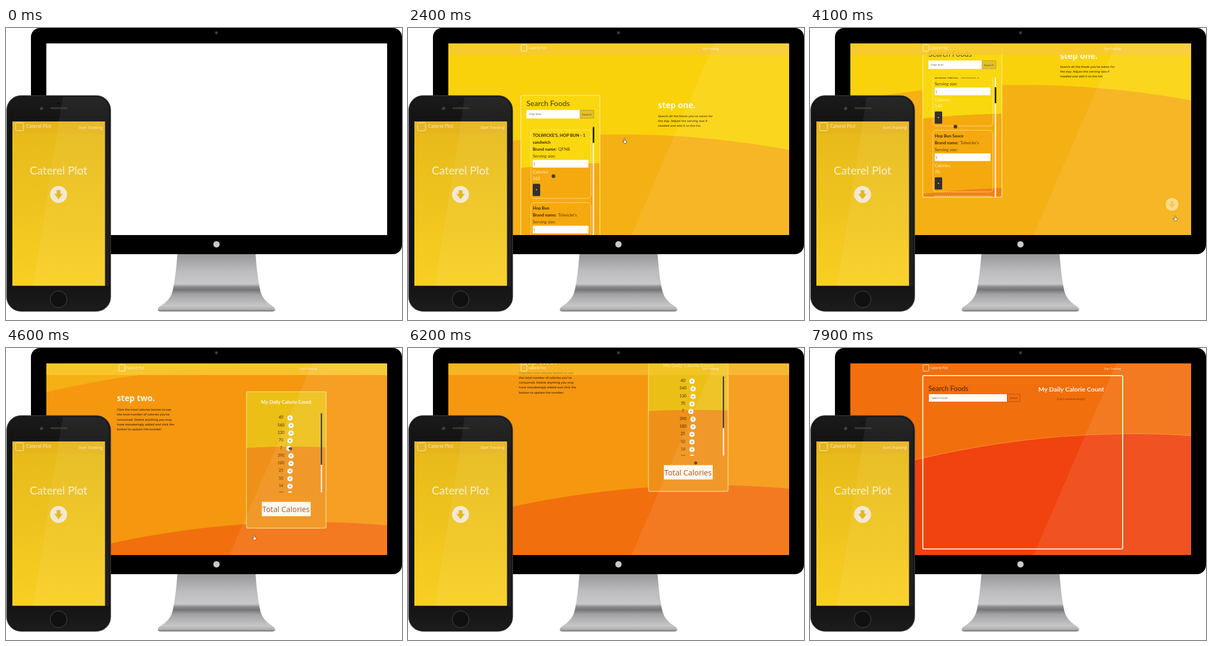
Animation of 746x550 px, one loop 8000 ms. Source, as an HTML page with a canvas:

```html
<!DOCTYPE html>
<html lang="en">
<head>
<meta charset="utf-8">
<title>Calorie app preview</title>
<style>
html, body { margin: 0; width: 100%; height: 100%; overflow: hidden; background: #fff; }
canvas { display: block; }
</style>
</head>
<body>
<canvas id="stage" width="746" height="550"></canvas>
<script>
const ctx = document.getElementById('stage').getContext('2d');
const LOOP = 8000, STEP = 100;
const APP = 'Caterel Plot';
const LATO = 'Lato, sans-serif', SANS = '"Open Sans", sans-serif';

const clamp = v => Math.max(0, Math.min(1, v));
const swing = p => 0.5 - Math.cos(Math.PI * clamp(p)) / 2;
const during = (t, start, length) => swing((t - start) / length);

function track(keys, t) {
  let a = keys[0];
  for (const b of keys) {
    if (t < b[0]) {
      const p = b === a ? 0 : swing((t - a[0]) / (b[0] - a[0]));
      return [a[1] + (b[1] - a[1]) * p, a[2] + (b[2] - a[2]) * p];
    }
    a = b;
  }
  return [a[1], a[2]];
}

function text(str, x, y, size, color, font = SANS, weight = 400, align = 'left') {
  ctx.font = `${weight} ${size}px ${font}`;
  ctx.textAlign = align;
  ctx.fillStyle = color;
  ctx.fillText(str, x, y);
}

function rect(x, y, w, h, fill) {
  ctx.fillStyle = fill;
  ctx.fillRect(x, y, w, h);
}

function round(x, y, w, h, r, fill, stroke, line = 1) {
  ctx.beginPath();
  ctx.roundRect(x, y, w, h, r);
  if (fill) { ctx.fillStyle = fill; ctx.fill(); }
  if (stroke) { ctx.strokeStyle = stroke; ctx.lineWidth = line; ctx.stroke(); }
}

function disc(x, y, r, fill, stroke) {
  ctx.beginPath();
  ctx.arc(x, y, r, 0, 7);
  ctx.fillStyle = fill;
  ctx.fill();
  if (stroke) { ctx.strokeStyle = stroke; ctx.lineWidth = 1; ctx.stroke(); }
}

function shape(points, fill) {
  ctx.beginPath();
  points.forEach(([x, y]) => ctx.lineTo(x, y));
  ctx.closePath();
  ctx.fillStyle = fill;
  ctx.fill();
}

function fade(y0, y1, ...stops) {
  const g = ctx.createLinearGradient(0, y0, 0, y1);
  stops.forEach(([p, c]) => g.addColorStop(p, c));
  return g;
}

function layer(dy, draw, alpha = 1) {
  ctx.save();
  ctx.globalAlpha *= alpha;
  ctx.translate(0, dy);
  draw();
  ctx.restore();
}

function clip(x, y, w, h, r = 0) {
  ctx.beginPath();
  ctx.roundRect(x, y, w, h, r);
  ctx.clip();
}

function arrowButton(x, y, r, back, front) {
  disc(x, y, r, back);
  const k = r / 16;
  shape([[-3.5, -8], [3.5, -8], [3.5, -1], [8, -1], [0, 9], [-8, -1], [-3.5, -1]]
    .map(([a, b]) => [x + a * k, y + b * k]), front);
}

// Fills everything below a shallow arc whose highest point is (px, y)
function wave(y, px, color, edge) {
  ctx.beginPath();
  for (let x = 70; x <= 722; x += 4) ctx.lineTo(x, y + 0.00029 * (x - px) ** 2);
  if (edge) { ctx.strokeStyle = edge; ctx.lineWidth = 1.5; ctx.stroke(); }
  ctx.lineTo(722, 3000);
  ctx.lineTo(70, 3000);
  ctx.fillStyle = color;
  ctx.fill();
}

const WAVES = [
  [290, 250, '#f9d20b'],
  [517, 400, '#f5b014'],
  [806, 480, '#f5970f'],
  [1098, 570, '#f26f0e'],
  [1352, 610, '#f0430f', '#f5a040']
];

function backdrop(scroll) {
  rect(76, 29, 642, 361, '#f9d114');
  WAVES.forEach(([y, ...rest]) => wave(y - scroll, ...rest));
}

function hero(t) {
  const show = during(t, 100, 700);
  layer(0, () => {
    text(APP, 401, 150, 56, '#fff', LATO, 400, 'center');
    text('Tracking Calories Made Easy.', 401, 184, 13.2, '#fffbe8', LATO, 400, 'center');
    arrowButton(401, 211, 12, '#fbf2c8', '#f2c514');
  }, show);
}

const FOODS = [
  { title: ["TOLWICKE'S, HOP BUN - 1", 'sandwich'], brand: 'QFNB', kcal: 562 },
  { title: ['Hop Bun'], brand: "Tolwicke's", kcal: 540 },
  { title: ['Hop Bun Sauce'], brand: "Tolwicke's", kcal: 70 },
  { title: ['Hop Bun Sauce'], brand: "Tolwicke's", kcal: 90 }
];

function foodItem(food, y) {
  const extra = (food.title.length - 1) * 13;
  ctx.setLineDash([3, 1]);
  round(231.5, y + 0.5, 113, 116 + extra, 6, null, 'rgba(255,245,200,.85)');
  ctx.setLineDash([]);
  food.title.forEach((line, i) => text(line, 235, y + 14 + i * 13, 8, '#3a2500', LATO, 700));
  const b = y + extra;
  text('Brand name:', 235, b + 27, 8, '#3a2500', LATO, 700);
  text(food.brand, 283, b + 27, 8, '#5a3c05', LATO);
  text('Serving size:', 235, b + 40, 8, '#5a3c05', LATO);
  rect(235, b + 44, 105, 14.5, '#fffdf8');
  text('1', 236, b + 55, 7, '#444');
  text('Calories:', 235, b + 70, 8, '#fff3d0', LATO);
  text(food.kcal, 235, b + 82, 8, '#fff3d0', LATO);
  round(235, b + 89, 14, 23, 1.5, '#33302e');
  text('+', 242, b + 103, 6, '#fff', SANS, 700, 'center');
  return y + 124 + extra;
}

function searchField(x, y, w, h, label, size) {
  rect(x, y, w, h, '#fffefa');
  text(label, x + 5, y + h / 2 + 2, size, '#665f55');
}

function stepOne(t) {
  const list = 167 * during(t, 3150, 850);
  ctx.save();
  clip(212, 53, 149, 285, 3);
  rect(212, 53, 149, 285, '#f9d80f');
  wave(181, 390, '#f5a90f');
  wave(320, 420, '#ee8418');
  text('Search Foods', 223, 74, 14, '#4a3500', LATO);
  searchField(223, 81, 101, 16, 'hop bun', 6);
  ctx.setLineDash([2, 1]);
  round(324, 81.5, 26, 15, 0, '#e5c02c', '#8a7420', 0.8);
  ctx.setLineDash([]);
  text('Search', 337, 91.5, 6, '#5c4a10', SANS, 400, 'center');
  ctx.save();
  clip(225, 113, 122, 225);
  let y = 118 - list;
  for (const food of FOODS) y = foodItem(food, y);
  ctx.restore();
  rect(348, 113, 2.5, 225, '#fff4d8');
  rect(348, 113 + list * 0.11, 3, 30, '#222');
  ctx.restore();
  round(212.5, 53.5, 149, 285, 3, null, '#ffeaa0', 1.3);
  disc(274, 205.5, 3.5, '#4a3a20');

  text('step one.', 471, 78, 15.5, '#fffbe8', SANS, 700);
  ["Search all the foods you've eaten for", 'the day. Adjust the serving size if', 'needed and add it to the list.']
    .forEach((line, i) => text(line, 471, 95 + i * 9, 5.9, '#4e3a04', SANS, 600));
  ctx.globalAlpha = t >= 3700 ? 0.62 : 1;
  arrowButton(682, 352, 12, '#fbf0c8', '#f2b818');
}

const COUNTS = [40, 540, 130, 70, 7, 390, 180, 25, 50, 14, 20];

function stepTwo(t) {
  text('step two.', 209, 80, 15.5, '#fffaf0', SANS, 700);
  ['Click the total calories button to see', "the total number of calories you've",
   'consumed. Delete anything you may', 'have mistakeingly added and click the', 'button to update the number.']
    .forEach((line, i) => text(line, 209, 98.5 + i * 9.1, 5.9, '#4a2a04', SANS, 600));

  ctx.save();
  clip(453, 62, 150, 257, 3);
  rect(453, 62, 150, 257, '#ecbf17');
  wave(166, 540, '#ef9018');
  text('My Daily Calorie Count', 528, 85, 9.2, '#fff8e8', LATO, 700, 'center');
  ctx.save();
  clip(500, 103, 80, 149.5);
  COUNTS.forEach((n, i) => {
    const y = 112 + i * 14.3;
    const x = 531 + 2 * String(n).length;
    text(n, 518, y + 1.5, 7.5, '#4a2c08', LATO, 400, 'center');
    disc(x, y, 5, '#fffaf0');
    disc(x, y, 1, '#4a3a2a');
  });
  ctx.restore();
  rect(593, 103, 2.5, 149, '#fff0d8');
  rect(593, 103, 2.5, 97, '#2a241e');
  rect(482, 270, 92, 27, '#fff7ec');
  text('Total Calories', 527.5, 289.5, 14.3, '#9a4a1c', SANS, 400, 'center');
  const [dx, dy] = track([[4600, 536, 170], [5200, 542, 266]], t);
  disc(dx, dy, 3, '#55402a');
  ctx.restore();
  round(453, 62.5, 150, 257, 3, null, '#f9dc88', 1.3);
}

function tracker() {
  round(212.5, 52, 376.5, 326.5, 2, null, '#fff0da', 2);
  text('Search Foods', 223, 80.5, 12.9, '#4a2408', LATO);
  searchField(224, 87, 147, 14, 'Search foods..', 5);
  ctx.setLineDash([2, 1]);
  round(371.5, 87, 24, 14, 0, null, '#7a3c10', 0.8);
  ctx.setLineDash([]);
  text('Search', 383.5, 96, 5, '#7a3408', SANS, 400, 'center');
  text('My Daily Calorie Count', 492, 82, 12, '#fff6ec', LATO, 700, 'center');
  text('(List is currently empty)', 492, 98, 4.9, '#7a2c08', SANS, 400, 'center');
}

function pointer(x, y, hand) {
  const pts = hand
    ? [[0, 0], [2, 0], [2, 4], [5, 5], [4, 9], [0, 9], [-3, 5], [0, 6]]
    : [[0, 0], [5, 5], [3, 5], [4, 8], [2, 8], [1, 6], [0, 7]];
  shape(pts.map(([a, b]) => [x + a, y + b]), '#fff');
  ctx.strokeStyle = '#4a4430';
  ctx.lineWidth = 0.8;
  ctx.stroke();
}

const MOUSE = [
  [1000, 540, 110], [1500, 407, 208], [2600, 407, 208], [3050, 679, 324],
  [3500, 682, 348], [4000, 687, 354], [4300, 687, 354], [5000, 120, 350]
];

function nav(t) {
  layer(0, () => rect(76, 29, 642, 22, '#f8ca32'), 0.86 * (1 - during(t, 6040, 400)));
  round(213, 31.5, 11, 12, 1.5, null, '#fff6e0', 1);
  text(APP, 227, 39.5, 6.2, '#fffaf0');
  text('Start Tracking', 554, 40.5, 5, '#fffaf0');
}

function page(t) {
  if (t < 100) return;
  const scroll = 390 * during(t, 1900, 700) + 400 * during(t, 4000, 700) + 400 * during(t, 6040, 700);
  const enter = during(t, 6600, 800);
  backdrop(scroll);
  layer(-scroll, () => hero(t));
  layer(390 - scroll, () => stepOne(t));
  layer(790 - scroll, () => stepTwo(t));
  layer(1190 - scroll - 70 * (1 - enter), tracker, Math.min(1, enter * 3));
  nav(t);
  if (t >= 1000 && t < 5000) {
    const [x, y] = track(MOUSE, t);
    pointer(x, y, t < 2600 && t > 1300 || t >= 3500);
  }
  shape([[577, 29], [718, 29], [718, 390], [421, 390]], 'rgba(255,255,255,.08)');
}

function stand() {
  ctx.beginPath();
  ctx.moveTo(323, 424);
  ctx.lineTo(470, 424);
  ctx.quadraticCurveTo(473, 465, 478, 490);
  ctx.bezierCurveTo(481, 508, 490, 516, 505, 526);
  ctx.quadraticCurveTo(511, 534, 500, 534);
  ctx.lineTo(293, 534);
  ctx.quadraticCurveTo(282, 534, 288, 526);
  ctx.bezierCurveTo(303, 516, 312, 508, 315, 490);
  ctx.quadraticCurveTo(320, 465, 323, 424);
  ctx.fillStyle = fade(426, 534, [0, '#98989a'], [0.3, '#bcbcbe'], [0.52, '#c8c8ca'], [0.57, '#8c8c8f'],
    [0.62, '#747477'], [0.7, '#a2a2a4'], [0.9, '#c6c6c8'], [0.96, '#b0b0b2'], [1, '#77777a']);
  ctx.fill();
}

function monitor(t) {
  stand();
  round(47, 0, 699, 426, 17, '#000');
  disc(396.5, 9, 3, '#2c2c2e');
  disc(396.5, 9, 1.2, '#55555a');
  disc(396.5, 407.5, 6, '#c8c8ca');
  rect(76, 29, 642, 361, '#fff');
  ctx.save();
  clip(76, 29, 642, 361);
  page(t);
  ctx.restore();
}

function phone() {
  round(1.5, 127.5, 195.5, 406, 27, '#161617', '#39393b', 1.5);
  round(4.5, 130.5, 189.5, 400, 24, fade(130, 531, [0, '#1a1a1b'], [0.15, '#111'], [0.86, '#121213'], [1, '#1c1c1d']));
  ctx.save();
  clip(4, 130, 190, 400, 24);
  shape([[107, 128], [196, 128], [196, 486], [51, 486]], 'rgba(255,255,255,.055)');
  ctx.restore();
  disc(67, 151.5, 3.5, '#303034');
  disc(67, 151.5, 1.5, '#55555e');
  disc(98.5, 141, 1.5, '#08080a');
  round(84, 149.5, 32, 3, 1.5, '#3c3c3e');
  disc(99, 511, 16, '#151516', '#454547');
  disc(99, 511, 13.5, '#101011');

  rect(12, 176, 174.5, 309.5, fade(176, 485, [0, '#e6b91a'], [0.5, '#efc31e'], [1, '#f8cf22']));
  rect(12, 176, 174.5, 23, 'rgba(225,165,40,.22)');
  shape([[100, 176], [186.5, 176], [186.5, 485.5], [51, 485.5]], 'rgba(255,255,255,.06)');
  round(18, 178.5, 15, 15, 2, null, '#f4ead0', 1);
  text(APP, 38, 188, 8.8, '#f6efdc');
  text('Start Tracking', 182, 190, 7.2, '#f6efdc', SANS, 400, 'right');
  text(APP, 99, 276, 21, '#f6efdc', LATO, 400, 'center');
  arrowButton(99, 313.5, 16, '#f1e9d4', '#e6b820');
}

function render(now) {
  const t = Math.floor(now % LOOP / STEP) * STEP;
  rect(0, 0, 746, 550, '#fff');
  monitor(t);
  phone();
}

const start = performance.now();
function tick() {
  render(performance.now() - start);
  requestAnimationFrame(tick);
}
tick();
</script>
</body>
</html>
```
